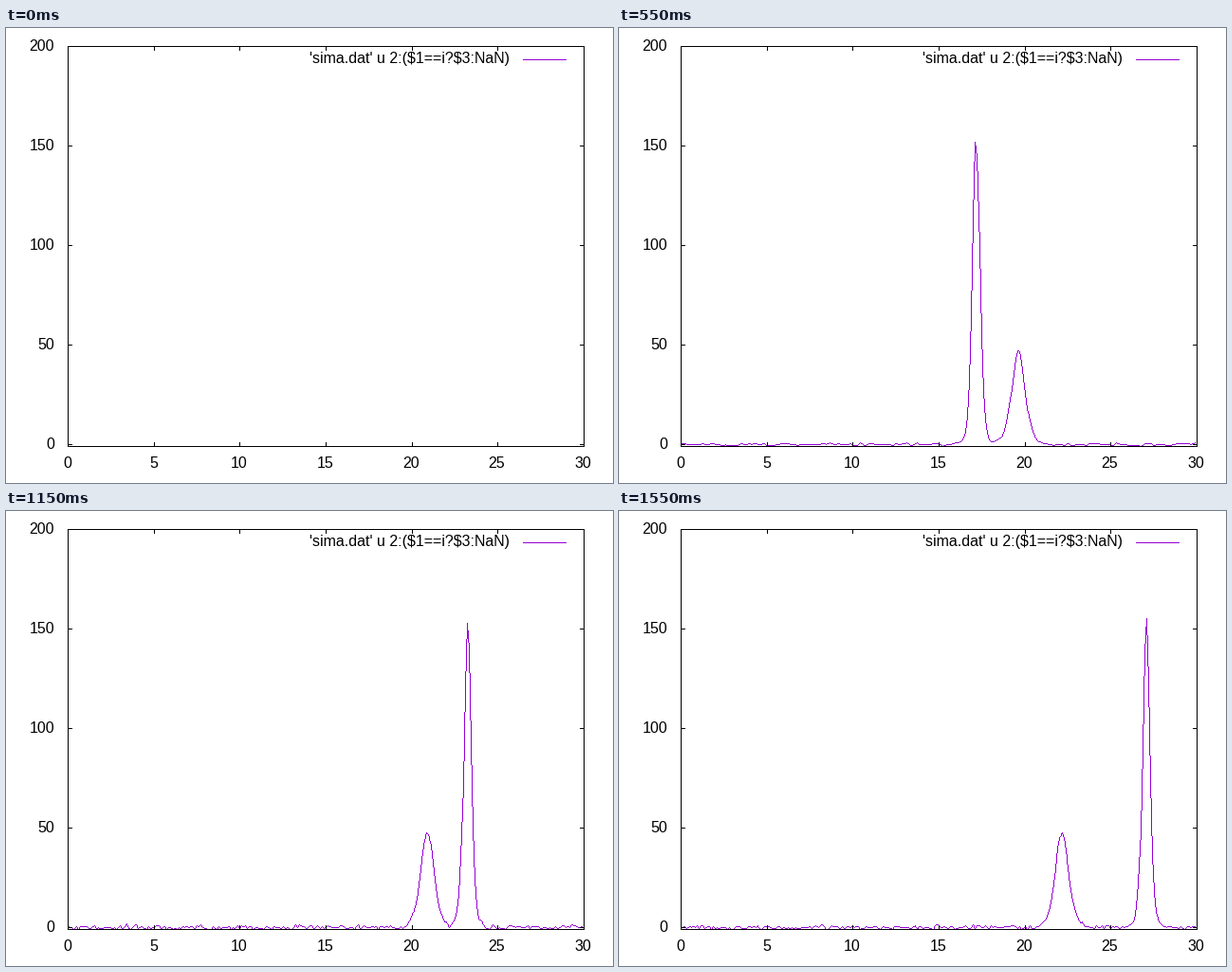
These frames come from a looping animation (640x480 px, 1600 ms). A matplotlib script:

```python
import numpy as np
import matplotlib.pyplot as plt
from matplotlib.animation import FuncAnimation
from matplotlib.patches import Rectangle

W, H, DPI = 640, 480, 100
FRAMES, STEP = 32, 50
LEFT, RIGHT, TOP, BOTTOM = 65, 609, 19, 441
X_MAX, Y_MIN, Y_MAX = 30, -1, 200
POINTS = 256
K_TALL, K_SMALL = 3.6, 2.0
PURPLE = (0x94, 0x00, 0xD3)

plt.rcParams["font.family"] = "Liberation Sans"
fig = plt.figure(figsize=(W / DPI, H / DPI), dpi=DPI, facecolor="white")
ax = fig.add_axes([0, 0, 1, 1])
ax.axis("off")


def px(x):
    return LEFT + (RIGHT - LEFT) * x / X_MAX


def py(y):
    return BOTTOM - (BOTTOM - TOP) * (y - Y_MIN) / (Y_MAX - Y_MIN)


def bar(x0, y0, x1, y1, color="black"):
    """Fill whole pixels, both ends included."""
    ax.add_patch(Rectangle((x0, y0), x1 - x0 + 1, y1 - y0 + 1, facecolor=color,
                           linewidth=0, antialiased=False, zorder=3))


def label(x, y, text, align):
    ax.text(x, y, text, ha=align, va="baseline", fontsize=16 * 72 / DPI,
            color="black", parse_math=False)


def draw_frame():
    for y in (TOP, BOTTOM):
        bar(LEFT, y, RIGHT, y)
    for x in (LEFT, RIGHT):
        bar(x, TOP, x, BOTTOM)
    for value in range(0, X_MAX + 1, 5):
        x = round(px(value))
        bar(x, TOP, x, TOP + 4)
        bar(x, BOTTOM - 4, x, BOTTOM)
        label(x - 0.5, 464, str(value), "center")
    for value in range(0, Y_MAX + 1, 50):
        y = round(py(value))
        bar(LEFT, y, LEFT + 4, y)
        bar(RIGHT - 4, y, RIGHT, y)
        label(51, y + 5, str(value), "right")
    label(531, 37, "'sima.dat' u 2:($1==i?$3:NaN)", "right")
    bar(545, 33, 590, 33, "#9400d3")


def solitons(x, n):
    """Two-soliton solution of the KdV equation, 12 (ln F)''."""
    x1 = 13.81 + 0.4775 * (n - 4)
    x2 = 17.88 + 0.158 * (n - 4)
    a, b = 2 * K_TALL, 2 * K_SMALL
    e1, e2 = np.exp(a * (x - x1)), np.exp(b * (x - x2))
    both = ((a - b) / (a + b)) ** 2 * e1 * e2
    f = 1 + e1 + e2 + both
    d1 = (a * e1 + b * e2 + (a + b) * both) / f
    d2 = (a * a * e1 + b * b * e2 + (a + b) ** 2 * both) / f
    return 12 * (d2 - d1 ** 2)


def ripples(x, n):
    """Dispersive waves running left, later broken up into noise."""
    rng = np.random.default_rng(n)
    noise = rng.normal(0, 1, POINTS)
    if n > 5:
        if n < 14:
            noise = np.convolve(noise, [0.25, 0.5, 0.25], "same")
        return noise * min(0.35 + 0.02 * n, 0.6)
    spread = 0.045 * n
    gap = np.clip(13.9 - x, 0, None)
    reach = 11.3 * n / 4
    wave = np.sin(2 / 3 * gap ** 1.5 / np.sqrt(spread))
    wave *= 0.9 * np.clip(gap / 4, 0, 1) * (gap < reach)
    ahead = (x > 14.8) & (x < 14.8 + 3.2 * n)
    return wave + 0.4 * noise * ahead


def trace(xs, ys):
    """Draw a polyline one pixel wide, without smoothing."""
    image = np.zeros((H, W, 4), np.uint8)
    image[..., :3] = PURPLE
    xs, ys = np.rint(xs).astype(int), np.rint(ys).astype(int)
    for x0, y0, x1, y1 in zip(xs, ys, xs[1:], ys[1:]):
        count = max(abs(x1 - x0), abs(y1 - y0)) + 1
        cols = np.rint(np.linspace(x0, x1, count)).astype(int)
        rows = np.rint(np.linspace(y0, y1, count)).astype(int)
        image[rows, cols, 3] = 255
    return image


grid = np.arange(POINTS) * X_MAX / POINTS
curve = ax.imshow(np.zeros((H, W, 4), np.uint8), extent=(0, W, H, 0),
                  interpolation="nearest", aspect="auto", zorder=2)
ax.set_xlim(0, W)
ax.set_ylim(H, 0)
draw_frame()


def update(n):
    if n == 0:
        curve.set_data(np.zeros((H, W, 4), np.uint8))
    else:
        y = np.maximum(solitons(grid, n) + ripples(grid, n), Y_MIN)
        curve.set_data(trace(px(grid), py(y)))
    return curve,


anim = FuncAnimation(fig, update, frames=FRAMES, interval=STEP, repeat=True,
                     repeat_delay=0, blit=False)
plt.show()
```
